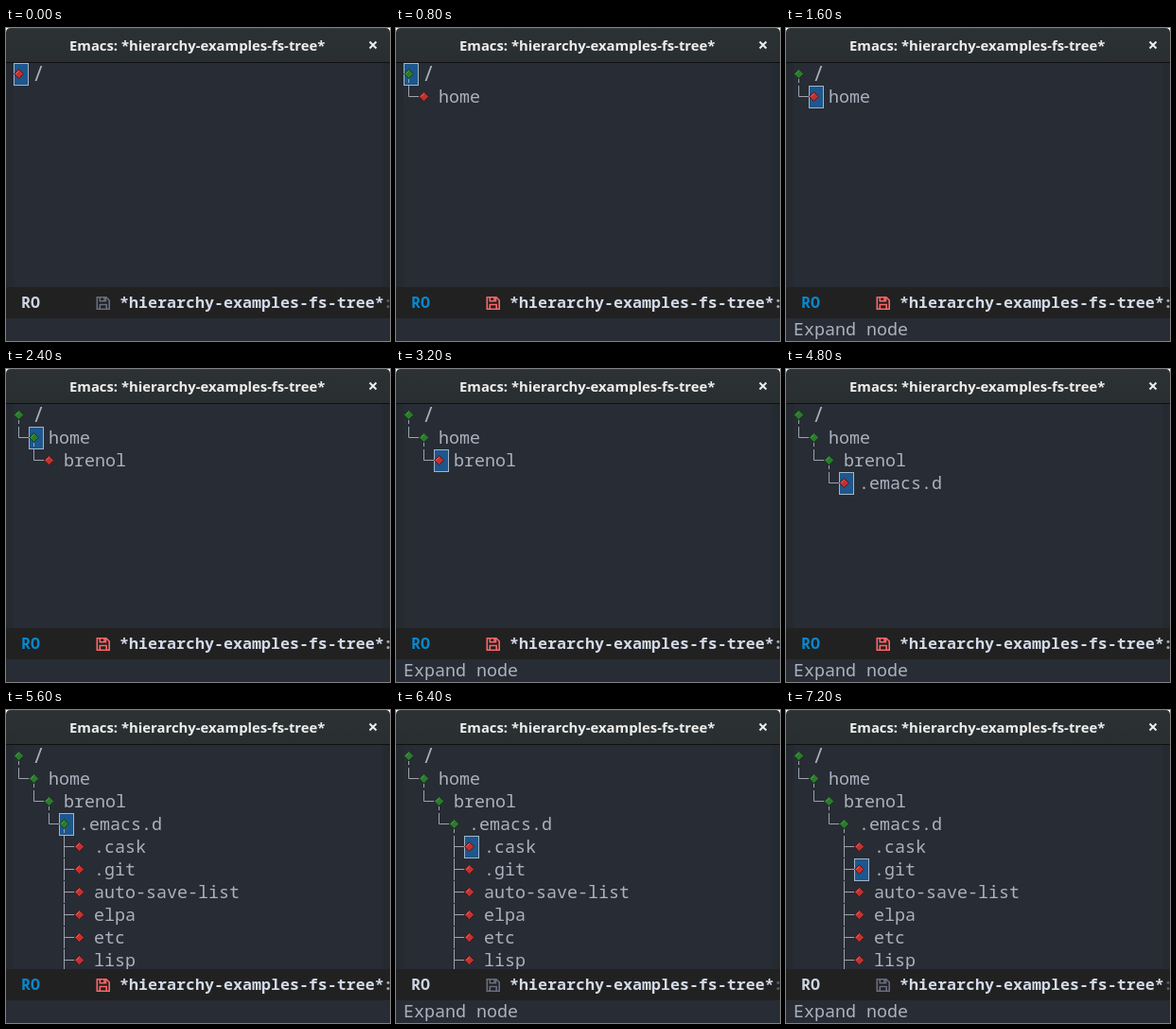
Animation, 406 px wide and 331 px high, one loop 8000 ms. Source, as an HTML page:

```html
<!DOCTYPE html>
<html lang="en">
<head>
<meta charset="utf-8">
<title>File tree</title>
<style>
  html, body { margin: 0; width: 100%; height: 100%; overflow: hidden; background: #282c34; }
  svg { display: block; width: 406px; height: 331px; }
  text { white-space: pre; }
  .title { font: 600 14.85px "Noto Sans", sans-serif; fill: #eeeeec; }
  .mono { font: 500 18.33px "Noto Sans Mono", monospace; fill: #abb2bf; }
  .mode { font: bold 16.67px "Noto Sans Mono", monospace; fill: #d3dae8; }
  .guide { stroke: #9da3ae; fill: none; }
  .cursor { fill: #1d578d; stroke: #a3b5c8; }
</style>
</head>
<body>
<svg viewBox="0 0 406 331">
  <defs>
    <linearGradient id="bar" x2="0" y2="1">
      <stop stop-color="#2c3234"/>
      <stop offset="1" stop-color="#292e30"/>
    </linearGradient>
    <clipPath id="buffer"><path d="M0 36H406V274H0Z"/></clipPath>
  </defs>
  <path fill="#282c34" d="M0 0H406V331H0Z"/>
  <path fill="#252930" d="M0 36H8V274H0ZM398 36H406V274H398Z"/>

  <path fill="#fff" d="M0 0H406V6H0Z"/>
  <path fill="url(#bar)" d="M0 36V5Q0 0 5 0H401Q406 0 406 5V36Z"/>
  <path stroke="#353b3d" d="M5 .5H401"/>
  <path stroke="#101010" d="M0 36.5H406"/>
  <text class="title" x="67" y="24">Emacs: *hierarchy-examples-fs-tree*</text>
  <path stroke="#eeeeec" stroke-width="2" d="M384.5 14.5L391.5 21.5M391.5 14.5L384.5 21.5"/>

  <g id="tree" clip-path="url(#buffer)"></g>

  <path fill="#212121" d="M0 274H406V307H0Z"/>
  <text class="mode" id="ro" x="16" y="296">RO</text>
  <g id="disk" fill="none" stroke-width="1.6">
    <path d="M96.3 284.8H106L109.2 288V297.2H96.3Z"/>
    <path d="M99.3 285V288.7H105.5V285M99.3 297V292.5H106.2V297"/>
    <path d="M104 285V289"/>
  </g>
  <text class="mode" x="120" y="296">*hierarchy-examples-fs-tree*</text>
  <text class="mode" id="colon" x="399" y="296">:</text>
  <text class="mono" id="echo" x="8" y="325">Expand node</text>
</svg>
<script>
const STEP = 800;
const names = ["/", "home", "brenol", ".emacs.d", ".cask", ".git",
  "auto-save-list", "elpa", "etc", "lisp"];

// visible rows, cursor row, echo shown, window active
const steps = [
  [1, 0, 0, 0], [2, 0, 0, 1], [2, 1, 1, 1], [3, 1, 0, 1], [3, 2, 1, 1],
  [4, 2, 0, 1], [4, 3, 1, 1], [10, 3, 0, 1], [10, 4, 1, 0], [10, 5, 1, 0]
];

const $ = id => document.getElementById(id);
const depth = row => Math.min(row, 4);

function diamond(x, y, open) {
  const [fill, edge, shine] = open
    ? ["#2c7a2f", "#17401a", "#4f9a50"]
    : ["#c03232", "#541717", "#dc6a62"];
  return `<path d="M${x - 5} ${y + .5}l5 -5l5 5l-5 5Z" fill="${fill}" stroke="${edge}"/>
    <path d="M${x - 3} ${y + .5}l3 -3" stroke="${shine}"/>`;
}

function guides(row, x, y) {
  const gx = x - 16;
  const stub = row <= 4 ? `M${gx} ${y - 18}v4` : "";
  const end = row < 4 ? y + .5 : y + 12;
  return `<path class="guide" d="${stub}M${gx} ${y - 11}V${end}M${gx} ${y + .5}H${x - 5}"/>`;
}

function drawRow(row, open, cursor) {
  const x = 13.5 + 16 * depth(row), y = 48 + 24 * row;
  const box = cursor
    ? `<rect class="cursor" x="${x - 5}" y="${y - 10.5}" width="15" height="23"/>` : "";
  // the root slash is taller than the font's own
  const label = row
    ? `<text class="mono" x="${x + 15.5}" y="${y + 6.5}">${names[row]}</text>`
    : `<text class="mono" style="font-size:21.5px" x="${x + 14.5}" y="${y + 7.5}">/</text>`;
  return (row ? guides(row, x, y) : "") + box + diamond(x, y, open) + label;
}

function show([rows, cursor, echo, active]) {
  const opened = Math.min(rows - 1, 4);
  const order = [...Array(rows).keys()];
  // the cursor row goes first so that guides stay above its box
  order.sort((a, b) => (b === cursor) - (a === cursor));
  $("tree").innerHTML = order.map(r => drawRow(r, r < opened, r === cursor)).join("");
  $("echo").style.display = echo ? "" : "none";
  $("ro").style.fill = active ? "#0a87cc" : "#cdd4e2";
  $("disk").style.stroke = active ? "#ff6668" : "#696d80";
  $("colon").style.fill = active ? "#a3a9b5" : "#555a63";
}

const start = performance.now();
let shown = -1;
function tick() {
  const i = Math.floor((performance.now() - start) / STEP) % steps.length;
  if (i !== shown) show(steps[shown = i]);
  requestAnimationFrame(tick);
}
tick();
</script>
</body>
</html>
```
